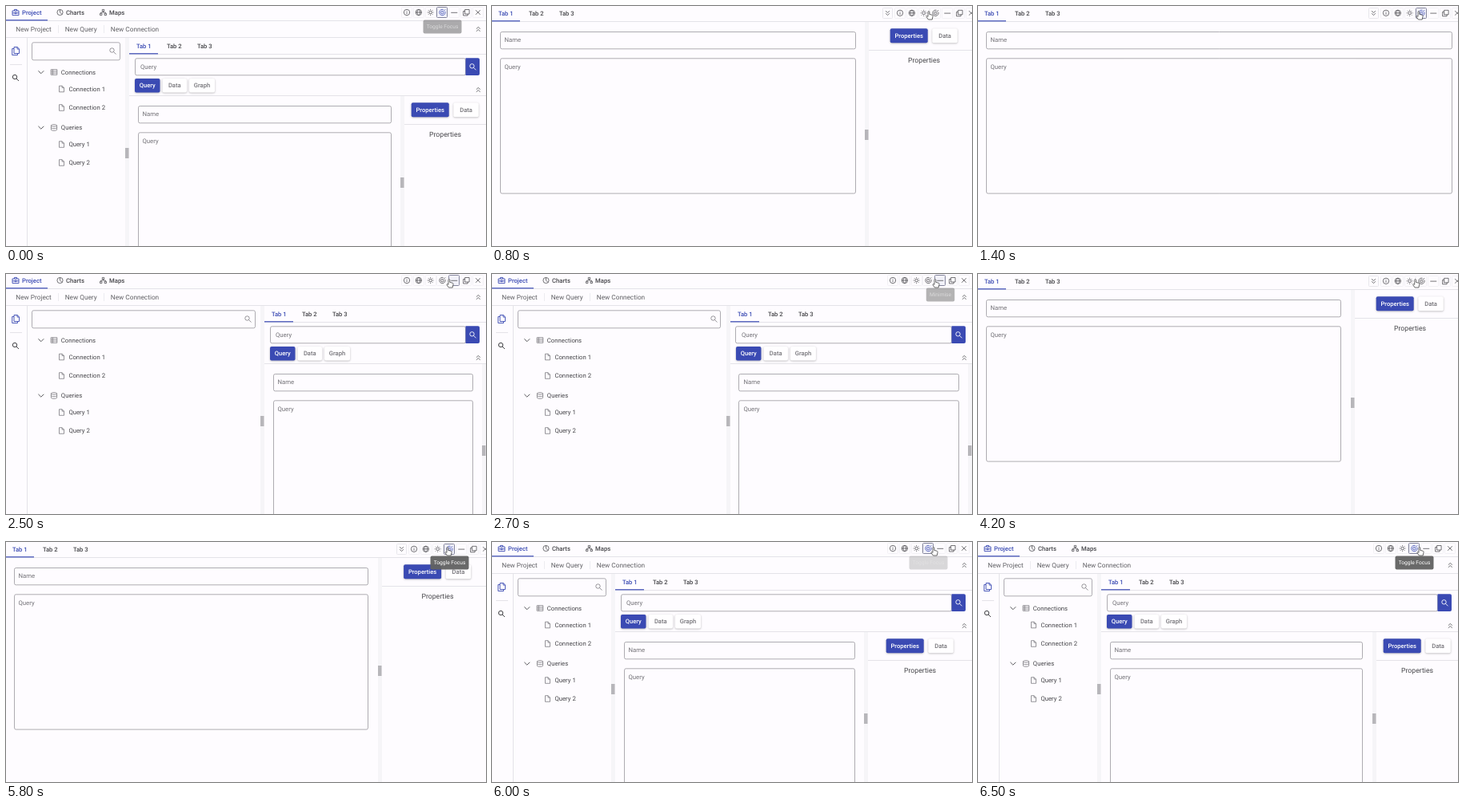
Write an HTML page with a canvas that moves like this. It is 600 by 301 pixels and loops after 7000 ms.

```html
<!DOCTYPE html>
<html lang="en">
<head>
<meta charset="utf-8">
<style>
html, body { margin: 0; width: 100%; height: 100%; overflow: hidden; background: #fefcff; }
canvas { display: block; }
</style>
</head>
<body>
<canvas id="stage" width="600" height="301"></canvas>
<script>
const g = document.getElementById('stage').getContext('2d');
g.textRendering = 'geometricPrecision';
const LOOP = 7000, BG = '#fefcff', BLUE = '#3a4ab3', DARK = '#454549', GREY = '#737277', LINE = '#e4e3e8';

const ring = (r, x = 0, y = 0) =>
  `M${x - r} ${y}a${r} ${r} 0 1 0 ${2 * r} 0a${r} ${r} 0 1 0 ${-2 * r} 0`;
const rays = [...Array(8).keys()].map(i => {
  const c = Math.cos(i * Math.PI / 4), s = Math.sin(i * Math.PI / 4);
  return `M${2.9 * c} ${2.9 * s}L${4 * c} ${4 * s}`;
}).join('');

// Icon outlines, centred on 0,0
const ICONS = {
  info: ring(3.7) + 'M0-.4V2M0-2.1V-1.2',
  globe: ring(3.7) + 'M-3.7 0H3.7M0-3.7C-2.4-1.5-2.4 1.5 0 3.7C2.4 1.5 2.4-1.5 0-3.7',
  sun: ring(1.8) + rays,
  focus: 'M3.5-1.2A3.7 3.7 0 1 1 1.2-3.5M1.7-.4A1.8 1.8 0 1 1 .4-1.7M0 0L3.7-3.7',
  minimise: 'M-4 .3H4',
  restore: 'M-1.5-3.5H4V2H-1.5ZM-1.5-1.5H-3.5V4H2V2',
  close: 'M-2.8-2.8L2.8 2.8M2.8-2.8L-2.8 2.8',
  up: 'M-2.4-.3L0-2.6L2.4-.3M-2.4 2.8L0 .5L2.4 2.8',
  down: 'M-2.4-2.8L0-.5L2.4-2.8M-2.4 .3L0 2.6L2.4 .3',
  open: 'M-3.4-1.7L0 1.7L3.4-1.7',
  search: ring(2.7, -1, -1) + 'M1 1L4 4',
  project: 'M-4-2H4V3.6H-4ZM-1.6-2V-3.6H1.6V-2M-4 .8H-1M1 .8H4M-1 0H1V1.6H-1Z',
  charts: ring(3.6) + 'M0-3.6V0L2.5 2.5',
  maps: 'M-1.2-3.6H1.2V-1.5H-1.2ZM-4 1.3H-1.6V3.5H-4ZM1.6 1.3H4V3.5H1.6ZM0-1.5V0M-2.8 1.3V0H2.8V1.3',
  pages: 'M-2-5H2.2L4.5-2.7V3H-2ZM2-5V-2.5H4.5M-2-3H-4.3V5H2.5V3',
  server: 'M-3.8-3.3H3.8V3.3H-3.8ZM-3.8-1.1H3.8M-3.8 1.1H3.8M-1.6-3.3V3.3',
  database: 'M-3.6-2.6C-3.6-4.2 3.6-4.2 3.6-2.6S-3.6-1-3.6-2.6V2.6C-3.6 4.2 3.6 4.2 3.6 2.6V-2.6M-3.6 0C-3.6 1.6 3.6 1.6 3.6 0',
  file: 'M-3-3.8H.6L3-1.4V3.8H-3ZM.6-3.8V-1.4H3',
  hand: 'M-2-4.6C-1.8-5.8-.4-5.8-.2-4.6V-1.6L3-.8C4-.5 4.2 0 4 1L3.2 5H-1.6L-4 1.6C-4.2.5-3.2.2-2.4 1L-2 1.4Z'
};
for (const k in ICONS) ICONS[k] = new Path2D(ICONS[k]);

function icon(name, x, y, color = GREY, width = .75, fill) {
  g.save();
  g.translate(x, y);
  if (fill) { g.fillStyle = fill; g.fill(ICONS[name]); }
  g.strokeStyle = color;
  g.lineWidth = width;
  g.stroke(ICONS[name]);
  g.restore();
}

function text(s, x, y, color = DARK, size = 7.75, weight = 400, align = 'left') {
  g.font = `${weight} ${size}px Roboto, sans-serif`;
  g.textAlign = align;
  g.fillStyle = color;
  g.fillText(s, x, y);
}

function rect(x, y, w, h, color) {
  g.fillStyle = color;
  g.fillRect(Math.round(x), y, w, h);
}

function rounded(x, y, w, h, r) {
  g.beginPath();
  g.roundRect(x, y, w, h, r);
}

// Outlined field between two x positions
function field(x, y, right, h) {
  const a = Math.floor(x) + .5;
  rounded(a, y + .8, Math.max(0, Math.floor(right) - .5 - a), h, 2);
  g.strokeStyle = '#8c8a90';
  g.lineWidth = .7;
  g.stroke();
}

function button(s, x, y, w, h, active) {
  g.save();
  g.shadowColor = 'rgba(0,0,0,.28)';
  g.shadowBlur = 2.5;
  g.shadowOffsetY = .7;
  g.fillStyle = active ? BLUE : '#fffeff';
  rounded(x, y, w, h, 2);
  g.fill();
  g.restore();
  text(s, x + w / 2, y + h / 2 + 2.6, active ? '#fff' : GREY, 7.6, 500, 'center');
}

const clamp = v => Math.max(0, Math.min(1, v));
const mix = (a, b, p) => a + (b - a) * p;
const easeInOut = p => p < .5 ? 4 * p ** 3 : 1 - (2 - 2 * p) ** 3 / 2;
const easeOut = p => 1 - (1 - p) ** 3;

const POINTER = [[0, 547], [1000, 547], [1300, 552], [1600, 552], [2000, 555], [3200, 555],
  [3500, 547.5], [5200, 548], [5600, 553], [LOOP, 553]];
function pointerX(t) {
  const i = POINTER.findIndex(p => p[0] > t), [a, x] = POINTER[i - 1], [b, z] = POINTER[i];
  return mix(x, z, (t - a) / (b - a));
}

// start, end, label, centre
const TIPS = [[-220, 800, 'Toggle Focus', 545.5], [1500, 2500, 'Toggle Focus', 554.5],
  [2500, 3300, 'Minimise', 560.5], [3200, 4000, 'Toggle Focus', 545.5],
  [5400, 6000, 'Toggle Focus', 554.5], [5900, LOOP, 'Toggle Focus', 545.5]];

function layout(t) {
  const focus = t >= 800 && t < 2500 || t >= 4000 && t < 6000;
  const left = focus ? -6 : t >= 2500 && t < 3100 ? mix(318, 149, easeInOut((t - 2500) / 600)) : 149;
  let right = 493;
  if (t >= 6000) right = 493 - 28 * Math.exp((6000 - t) / 60);
  else if (t >= 4000) right = 464.8 + 139 * Math.exp((4000 - t) / 42);
  else if (t >= 2500) right = 595;
  else if (t >= 800) right = mix(466, 604.5, easeOut(clamp((t - 800) / 500)));
  return { focus, left, right, width: focus ? 609 : 600 };
}

function splitter(x, top, middle) {
  rect(x, top, 5, 301 - top, '#f6f5f8');
  rect(x, middle - 6.5, 4.5, 13, '#b7b6ba');
}

function header() {
  text('Project', 20, 11, BLUE, 7.7, 500);
  text('Charts', 75, 11, DARK, 7.7, 500);
  text('Maps', 129, 11, DARK, 7.7, 500);
  icon('project', 12, 8, BLUE, .9);
  icon('charts', 67.5, 8, DARK);
  icon('maps', 121.5, 8, DARK);
  rect(0, 18, 600, 1, LINE);
  rect(0, 17.2, 52, 1.2, BLUE);
  text('New Project', 12.3, 32, '#606064', 8.25);
  text('New Query', 73.7, 32, '#606064', 8.25);
  text('New Connection', 130.8, 32, '#606064', 8.25);
  rect(65, 24, 1, 10, '#ecebf0');
  rect(122, 24, 1, 10, '#ecebf0');
  icon('up', 590.3, 29, DARK);
  rect(0, 39, 600, 1, LINE);
}

function sidebar(left) {
  rect(26, 40, 1, 261, LINE);
  icon('pages', 12, 56.5, BLUE, .9);
  rect(5, 73, 15, 1, LINE);
  icon('search', 12, 90, DARK, 1);
  field(32, 45, left - 6, 22);
  icon('search', left - 15.5, 56.5);
  for (const [y, s, kind] of [[83, 'Connections', 'server'], [152.5, 'Queries', 'database']]) {
    icon('open', 43.8, y, DARK, .9);
    icon(kind, 60, y, GREY);
    text(s, 68.8, y + 2.9);
  }
  for (const [y, s] of [[104, 'Connection 1'], [127.5, 'Connection 2'], [173.5, 'Query 1'], [196.5, 'Query 2']]) {
    icon('file', 69.5, y);
    text(s, 78.4, y + 2.9);
  }
  splitter(left, 40, 184.5);
}

function mainArea({ focus, right, width }, x) {
  const y = focus ? -41 : 0, top = focus ? 19 : 112;
  for (let i = 0; i < 3; i++) text('Tab ' + (i + 1), x + 9 + 38 * i, 52.8 + y, i ? DARK : BLUE, 7.6, 500);
  rect(x, 60 + y, 610, 1, LINE);
  rect(x, 59.2 + y, 36, 1.2, BLUE);
  if (!focus) {
    field(x + 7, 65, 575, 21);
    text('Query', x + 14, 78.6, GREY);
    g.fillStyle = BLUE;
    rounded(574.5, 65.3, 17.5, 21.7, [0, 2, 2, 0]);
    g.fill();
    icon('search', 583.5, 76.3, '#fff', .9);
    button('Query', x + 7, 91, 31.5, 17.5, true);
    button('Data', x + 41.5, 91, 30.5, 17.5);
    button('Graph', x + 75, 91, 32, 17.5);
    icon('up', 590.3, 105, DARK);
    rect(x, 112, 600, 1, LINE);
  }
  const edge = right - 11;
  field(x + 11, top + 12.7, edge, 21.3);
  text('Name', x + 16.5, top + 26, GREY);
  field(x + 11, top + 46, edge, 169.3);
  text('Query', x + 16.5, top + 60, GREY);

  const panel = right + 5, mid = (panel + width) / 2;
  splitter(right, top + 1, focus ? 161.5 : 221.5);
  g.save();
  g.beginPath();
  g.rect(panel, top + 1, width, 301);
  g.clip();
  if (width - panel > 1) {
    button('Properties', mid - 42.3, top + 9.3, 47, 18, true);
    button('Data', mid + 10.3, top + 9.3, 31.5, 18);
    rect(panel, top + 36, width, 1, LINE);
    text('Properties', mid, top + 52.3, DARK, 8.7, 400, 'center');
  }
  g.restore();
}

function windowTools(focus, hover) {
  const dx = focus ? 9 : 0, y = focus ? 8.8 : 8;
  ['info', 'globe', 'sun', 'focus', 'minimise', 'restore', 'close'].forEach((name, i) => {
    const x = 501 + i * 14.82 + dx, on = name === hover;
    rounded(Math.round(x) - 6.5, Math.round(y) - 6.5, 13, 13, 1);
    g.fillStyle = on ? '#f1f1f9' : BG;
    g.fill();
    g.strokeStyle = on ? '#84859c' : '#f2f1f5';
    g.lineWidth = 1;
    g.stroke();
    icon(name, x, y, on && name === 'focus' ? BLUE : DARK);
  });
  if (focus) {
    rounded(488.5, 2.5, 12, 13, 1);
    g.strokeStyle = '#e8e7ec';
    g.lineWidth = 1;
    g.stroke();
    icon('down', 494.5, 9, DARK);
  }
}

function tooltip(s, x, alpha) {
  const w = s.length > 9 ? 48 : 35.5;
  g.save();
  g.globalAlpha = alpha;
  g.fillStyle = 'rgba(97,97,97,.95)';
  rounded(x - w / 2, 17.6, w, 16.9, 2);
  g.fill();
  text(s, x, 28.3, '#fff', 6.65, 400, 'center');
  g.restore();
}

const start = performance.now();

function draw(now) {
  const t = Math.floor(Math.max(0, now - start) % LOOP / 100) * 100;
  const view = layout(t), px = pointerX(t);
  const hover = view.focus ? px >= 550 && 'focus' : px > 553.5 ? 'minimise' : 'focus';
  g.fillStyle = BG;
  g.fillRect(0, 0, 600, 301);
  if (!view.focus) {
    header();
    sidebar(view.left);
  }
  mainArea(view, view.left + 5);
  windowTools(view.focus, hover);
  for (const [a, b, s, x] of TIPS)
    if (t > a && t < b) tooltip(s, x, clamp((t - a) / 400));
  if (t >= 500) icon('hand', px, 12, '#444', .8, '#fff');
  requestAnimationFrame(draw);
}
requestAnimationFrame(draw);
</script>
</body>
</html>
```
